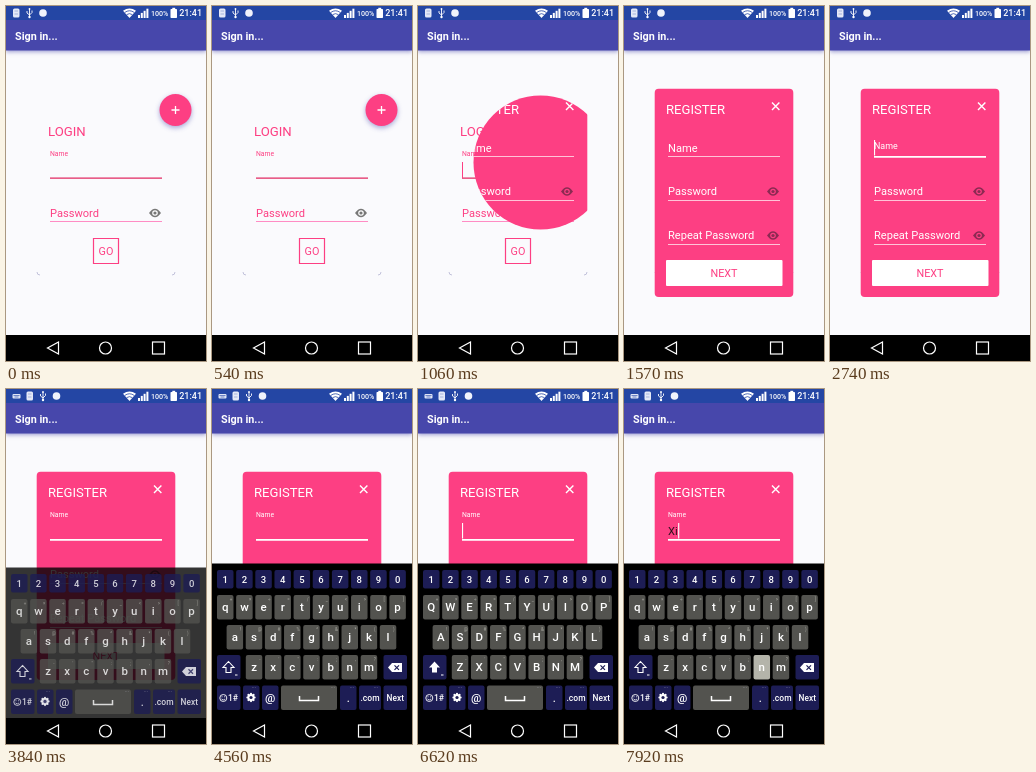
An HTML page with a canvas that plays this animation: 200 px wide and 355 px high, repeating every 8 s.

```html
<!DOCTYPE html>
<html lang="en">
<head>
<meta charset="utf-8">
<title>Sign in</title>
<style>
  html, body { margin: 0; width: 100%; height: 100%; overflow: hidden; background: #fafafa; }
  canvas { display: block; width: 200px; height: 355px; }
</style>
</head>
<body>
<canvas id="stage"></canvas>
<script>
const LOOP = 8000, W = 200, H = 355;
const PINK = '#fd3f83', WHITE = '#fff', NAVY = '#1d1d55', GREY = '#53534f';
const canvas = document.getElementById('stage');
const scale = window.devicePixelRatio || 1;
canvas.width = W * scale;
canvas.height = H * scale;
const c = canvas.getContext('2d');

const clamp = v => Math.max(0, Math.min(1, v));
const progress = (t, start, duration) => clamp((t - start) / duration);
const mix = (a, b, p) => a + (b - a) * p;
const between = (t, a, b) => t >= a && t < b;

function rect(x, y, w, h, color, radius = 0) {
  c.fillStyle = color;
  c.beginPath();
  c.roundRect(x, y, w, h, radius);
  c.fill();
}

function disc(x, y, r, color) {
  c.fillStyle = color;
  c.beginPath();
  c.arc(x, y, r, 0, 7);
  c.fill();
}

// Vertically centred on the capital height.
function text(str, x, y, size, color, align = 'left', weight = 400) {
  c.font = `${weight} ${size}px Roboto, sans-serif`;
  c.textAlign = align;
  c.fillStyle = color;
  c.fillText(str, x, y + size * 0.36);
}

function draw(path, color, width = 1, fill = false) {
  const shape = new Path2D(path);
  c.lineWidth = width;
  c.strokeStyle = c.fillStyle = color;
  fill ? c.fill(shape) : c.stroke(shape);
}

function shadowed(blur, dy, alpha, paint) {
  c.save();
  c.shadowColor = `rgba(70,70,170,${alpha})`;
  c.shadowBlur = blur * scale;
  c.shadowOffsetY = dy * scale;
  paint();
  c.restore();
}

function eye(x, y, color, pupil) {
  draw(`M${x - 6} ${y}Q${x} ${y - 8.5} ${x + 6} ${y}Q${x} ${y + 8.5} ${x - 6} ${y}Z`, color, 1, true);
  disc(x, y, 2.8, pupil);
  disc(x, y, 1.6, color);
}

function statusIcons(t) {
  let x = 10;
  if (t >= 3600) {
    rect(6.5, 5, 8, 4.5, '#dfe5f6', 1);
    draw('M7.5 6.5h6M8.5 8h4', '#2446a4', 0.6);
    x += 13.5;
  }
  rect(x - 3, 2.5, 6.5, 9, '#e4e9f7', 1.5);
  draw(`M${x - 1.5} 5h3.5M${x - 1.5} 8h3.5`, '#8c9fd0', 0.7);
  x += 13.5;
  draw(`M${x} 3v8M${x - 2.5} 5v2l2.5 2l2.5-2.5v-2`, WHITE, 0.9);
  disc(x, 11, 1.2, WHITE);
  disc(x, 3, 0.9, WHITE);
  disc(x + 13.5, 7, 3.8, '#f0f3fb');

  draw('M117 4.8Q123.5 0 130 4.8L123.5 12Z', WHITE, 1, true);
  draw('M118.7 6.5Q123.5 3 128.3 6.5M120.7 8.6Q123.5 6.7 126.3 8.6', '#2446a4', 0.8);
  for (let i = 0; i < 4; i++) rect(132 + i * 2.8, 9 - i * 2.1, 2, 3 + i * 2.1, WHITE);
  text('100%', 145, 7.3, 7.1, WHITE, 'left', 500);
  rect(164.5, 3, 6.5, 9, WHITE, 0.7);
  rect(166.3, 1.8, 2.9, 2, WHITE);
  text('21:41', 196, 7, 9, WHITE, 'right', 500);
}

function chrome(t) {
  shadowed(4, 1, 0.5, () => rect(0, 14, W, 30.5, '#4747ab'));
  rect(0, 0, W, 14, '#2446a4');
  statusIcons(t);
  text('Sign in...', 9, 30, 10.8, WHITE, 'left', 700);
}

function navBar() {
  rect(0, 329, W, 26, '#000');
  draw('M52.5 336v12L41.5 342Z', WHITE, 1.2);
  c.beginPath();
  c.arc(99.5, 342, 6, 0, 7);
  c.stroke();
  c.strokeRect(146.5, 336, 12, 12);
}

function login(t) {
  // The white card only shows at its rounded bottom corners.
  draw('M31 266q0 3 3 3M169 266q0 3-3 3', '#b4b4d2', 0.8);
  text('LOGIN', 42, 125, 13.2, PINK);
  text('Name', 44, 148, 6.8, PINK);
  rect(44, 171.5, 112, 1.3, '#e22962');
  if (t % 1000 < 500 && t > 900) rect(44, 156, 1, 16, PINK);
  text('Password', 44, 207, 11.1, PINK);
  rect(44, 215, 112, 1, '#ff8cc4');
  eye(149, 207, '#777', '#fcfcfd');
  draw('M87.5 232.5h25v25h-25z', PINK, 1.2);
  text('GO', 100, 245, 10.8, PINK, 'center');
}

function fab() {
  shadowed(5, 2, 0.45, () => disc(169.5, 104, 16, PINK));
  draw('M165.5 104h8M169.5 100v8', WHITE, 1.3);
}

function field(label, y) {
  text(label, 44, y, 11.1, WHITE);
  rect(44, y + 8.5, 112, 1, '#ffc3d8');
  eye(149, y, '#8c2a52', PINK);
}

function nameField(t) {
  const float = progress(t, 2580, 320);
  const focused = t >= 2240;
  text('Name', 44, mix(142, 126, float ** 3), mix(11.1, 6.8, float), WHITE);
  rect(44, 150, 112, focused ? 1.7 : 1, focused ? WHITE : '#ffc3d8');

  const typed = t >= 7480 ? 'Xi' : t >= 6960 ? 'X' : '';
  text(typed, 44, 142, 11.1, '#30101c');
  const caretX = 44 + (typed ? c.measureText(typed).width + 0.5 : 0);
  const blinking = between(t, 2240, 3100) || t >= 4600;
  if (blinking && ((t + 400) % 1000 < 500 || t >= 6960)) rect(caretX, 134, 1.1, 15.5, WHITE);
}

function register(t) {
  const p = progress(t, 900, 350);
  if (!p) return;
  c.save();
  if (p < 1) {
    const travel = 1 - (1 - p) ** 1.7;
    c.beginPath();
    c.arc(mix(170, 100, travel ** 0.9), mix(104, 187, travel ** 1.06), mix(16, 127, p), 0, 7);
    c.clip();
  }
  rect(30.7, 82.7, 138.6, 208.3, PINK, 4);
  text('REGISTER', 42, 103.3, 13.1, WHITE);
  draw('M148 96.5l7.4 7.4M155.4 96.5l-7.4 7.4', WHITE, 1.4);
  nameField(t);
  field('Password', 185.5);
  field('Repeat Password', 229.5);
  rect(42, 254, 116.5, 26, WHITE, 1);
  text('NEXT', 100, 267.5, 10.8, PINK, 'center');
  c.restore();
}

function key(label, x, y, w, h, color, size = 11) {
  rect(x, y, w, h, color, 2);
  text(label, x + w / 2, y + h / 2, size, WHITE, 'center', 500);
}

function letterRow(letters, x, y, symbols, upper, pressed) {
  [...letters].forEach((letter, i) => {
    const left = x + i * 19.15;
    const down = letter === pressed;
    key(upper ? letter.toUpperCase() : letter, left, y, 16.5, 24.5, down ? '#b4b4aa' : GREY, 11.5);
    text(symbols[i], left + 14, y + 4.5, 4.5, '#aaaaa2', 'center');
  });
}

function pressedKey(t) {
  if (between(t, 5500, 5610)) return 'shift';
  if (between(t, 6960, 7070)) return 'x';
  if (between(t, 7480, 7590)) return 'i';
  return t >= 7900 ? 'n' : '';
}

function keyboard(t) {
  const p = progress(t, 3600, 400);
  if (!p) return;
  const upper = between(t, 5500, 6960);
  const pressed = pressedKey(t);
  c.save();
  c.globalAlpha = 1 - (1 - p) ** 1.7;
  c.translate(0, 25 * (1 - p) ** 2);
  rect(0, 174.5, W, 154.5, '#000');

  [...'1234567890'].forEach((d, i) => key(d, 5 + i * 19.15, 181, 16.5, 18.5, NAVY, 9.5));
  letterRow('qwertyuiop', 5, 206, '+×÷=/_<>[]', upper, pressed);
  letterRow('asdfghjkl', 14.6, 236, '!@#%^&*()', upper, pressed);
  letterRow('zxcvbnm', 33.8, 266, '-\'":;,?', upper, pressed);

  rect(5, 266, 23.5, 24.5, pressed === 'shift' ? '#8585a5' : NAVY, 2);
  draw('M16.5 272.5l5.5 6h-3v5h-5v-5h-3z', WHITE, 1.1, upper);
  draw('M23 286h2.5', WHITE, 1);
  rect(171.5, 266, 23.5, 24.5, NAVY, 2);
  draw('M176 278.5l4-4.5h10v9h-10z', WHITE, 1, true);
  draw('M182.5 276.3l4.5 4.5M187 276.3l-4.5 4.5', NAVY, 1.2);

  const y = 296.5, h = 24.5;
  rect(5, y, 23.5, h, NAVY, 2);
  c.strokeStyle = WHITE;
  c.lineWidth = 0.9;
  c.beginPath();
  c.arc(11.3, 309, 3.5, 0, 7);
  c.stroke();
  draw('M9.5 310q1.8 2 3.6 0M10 307.3v1M12.6 307.3v1', WHITE, 0.8);
  text('1#', 16, 309, 8.5, WHITE, 'left', 500);
  rect(31, y, 16.5, h, NAVY, 2);
  for (let i = 0; i < 8; i++) {
    const a = i * Math.PI / 4;
    disc(39 + 3.6 * Math.cos(a), 308.5 + 3.6 * Math.sin(a), 1.1, WHITE);
  }
  disc(39, 308.5, 3.6, WHITE);
  disc(39, 308.5, 1.6, NAVY);
  key('@', 50, y, 16.5, h, NAVY, 11.5);
  rect(69, y, 56, h, GREY, 2);
  draw('M87.5 307v4.5h19v-4.5', WHITE, 1.5);
  key('.', 128, y, 16.5, h, NAVY);
  key('.com', 147, y, 22, h, NAVY, 8.5);
  key('Next', 171.5, y, 23.5, h, NAVY, 8.3);
  for (const x of [42, 121, 140, 164]) text('...', x, 297.5, 5, '#b0b0bd', 'center');
  c.restore();
}

function frame(now) {
  const t = now % LOOP;
  c.setTransform(scale, 0, 0, scale, 0, 0);
  rect(0, 0, W, H, '#fafafd');
  chrome(t);
  login(t);
  if (t < 900) fab();
  register(t);
  keyboard(t);
  navBar();
  requestAnimationFrame(frame);
}
requestAnimationFrame(frame);
</script>
</body>
</html>
```
